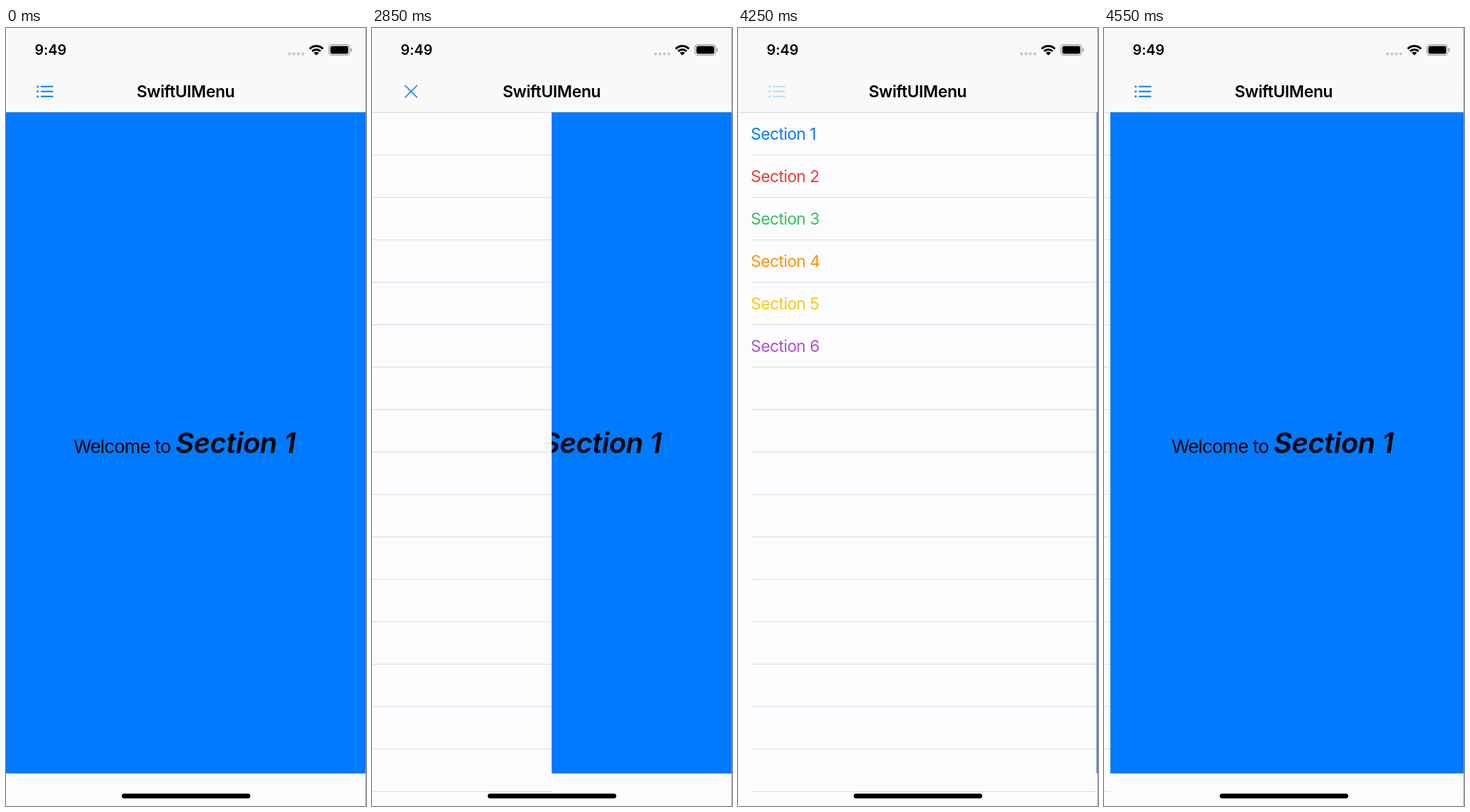
An HTML page with a canvas for the animation above (4.6 s loop, 509 by 1100 pixels).

```html
<!DOCTYPE html>
<html lang="en">
<head>
<meta charset="utf-8">
<title>Slide-in menu</title>
<style>
  html, body { margin: 0; width: 100%; height: 100%; overflow: hidden; background: #fcfcfe; }
  canvas { display: block; width: 509px; height: 1100px; }
</style>
</head>
<body>
<canvas id="stage" width="509" height="1100"></canvas>
<script>
const W = 509, H = 1100, LOOP = 4600, STEP = 50;
const BAR = 119.2, PAGE_END = 1054, RULE = 119, ROW = 60, INSET = 21;
const SLIDE = 350, FADE = 250, PRESS = 85;
const OPEN = 2675, HOLD = 2900, SHOWN = 4100, CLOSE = 4233;
const PAPER = '#fcfcfe', BLUE = '#007aff', TINT = '#0080ee';
const SECTIONS = [BLUE, '#f03a2f', '#30c456', '#f89408', '#f8cb08', '#ab51d8'];

const ctx = document.getElementById('stage').getContext('2d');
const clamp = v => Math.min(1, Math.max(0, v));

// Ease-in-out: cubic Bezier (.42, 0) (.58, 1)
function ease(x) {
  x = clamp(x);
  let lo = 0, hi = 1;
  for (let i = 0; i < 24; i++) {
    const s = (lo + hi) / 2, r = 1 - s;
    if (1.26 * r * r * s + 1.74 * r * s * s + s * s * s < x) lo = s; else hi = s;
  }
  return lo * lo * (3 - 2 * lo);
}

function text(str, x, y, font, color, spacing, align = 'left') {
  ctx.font = font + ' Inter, "Liberation Sans", sans-serif';
  ctx.letterSpacing = spacing + 'px';
  ctx.textAlign = align;
  ctx.fillStyle = color;
  ctx.fillText(str, x, y);
}

function rect(x, y, w, h, color) {
  ctx.fillStyle = color;
  ctx.fillRect(x, y, w, h);
}

function pill(x, y, w, h, r, color) {
  ctx.fillStyle = color;
  ctx.beginPath();
  ctx.roundRect(x, y, w, h, r);
  ctx.fill();
}

function dot(x, y, r, color) {
  ctx.fillStyle = color;
  ctx.beginPath();
  ctx.arc(x, y, r, 0, Math.PI * 2);
  ctx.fill();
}

function line(x1, y1, x2, y2) {
  ctx.beginPath();
  ctx.moveTo(x1, y1);
  ctx.lineTo(x2, y2);
  ctx.stroke();
}

function wifi(x, y) {
  const a = Math.PI * 0.25;
  ctx.strokeStyle = '#000';
  ctx.lineCap = 'butt';
  ctx.lineWidth = 3;
  for (const r of [13.2, 8.3]) {
    ctx.beginPath();
    ctx.arc(x, y, r, -Math.PI / 2 - a, -Math.PI / 2 + a);
    ctx.stroke();
  }
  ctx.fillStyle = '#000';
  ctx.beginPath();
  ctx.moveTo(x, y);
  ctx.arc(x, y, 5, -Math.PI / 2 - a, -Math.PI / 2 + a);
  ctx.fill();
}

function battery() {
  ctx.strokeStyle = '#a0a0a6';
  ctx.lineWidth = 1.3;
  ctx.beginPath();
  ctx.roundRect(456.6, 23.6, 29.4, 14.8, 4.2);
  ctx.stroke();
  pill(458.6, 25.6, 25.4, 10.8, 2.5, '#000');
  pill(487.2, 28.6, 1.7, 5, 1, '#a0a0a6');
}

function icon(isClose, alpha) {
  ctx.globalAlpha = alpha;
  ctx.strokeStyle = TINT;
  ctx.lineCap = 'round';
  ctx.lineWidth = 1.9;
  if (isClose) {
    line(47, 81.5, 63.5, 98);
    line(63.5, 81.5, 47, 98);
  } else {
    for (const y of [82.8, 89.8, 96.8]) {
      dot(44.8, y, 1.5, TINT);
      line(50, y, 66, y);
    }
  }
  ctx.globalAlpha = 1;
}

function topBar(isClose, alpha) {
  rect(0, 0, W, BAR, '#f9f9fa');
  rect(0, BAR, W, 0.45, 'rgba(0, 0, 0, 0.3)');
  text('9:49', 40.5, 38.4, '600 20px', '#000', -0.1);
  for (let i = 0; i < 4; i++) dot(400.8 + i * 6.3, 36.6, 2.1, '#c6c5d0');
  wifi(438.8, 38.8);
  battery();
  icon(isClose, alpha);
  text('SwiftUIMenu', 254, 97.6, '600 23px', '#000', -0.38, 'center');
}

function page() {
  rect(0, 0, W, H, PAPER);
  rect(0, RULE, W, PAGE_END - RULE, BLUE);
  text('Welcome to', 95.4, 601, '400 26px', '#000', -0.8);
  text('Section 1', 239.8, 601, 'italic 600 40px', '#000', -0.4);
}

function menu(edge) {
  if (edge <= 0) return;
  ctx.save();
  ctx.translate(edge - W, 0);
  rect(0, RULE, W, H - RULE, PAPER);
  for (let i = 1; i <= 16; i++) {
    rect(INSET, RULE + i * ROW, W - INSET, 1, '#dcdbe6');
  }
  SECTIONS.forEach((color, i) =>
    text('Section ' + (i + 1), 20, 158 + i * ROW, '400 22.8px', color, -0.5));
  ctx.restore();
}

// Green fringe along the right side, darker where it borders the blue page
function fringe(edge) {
  rect(W - 1, 0, 1, H, '#4cff1c');
  if (edge < W) rect(W - 1, RULE, 1, PAGE_END - RULE, '#00ec00');
}

function iconAlpha(t) {
  for (const tap of [OPEN, CLOSE]) {
    const dt = t - tap;
    if (dt >= -PRESS && dt < FADE) return 0.2 + 0.8 * clamp(dt / FADE);
  }
  return 1;
}

function menuEdge(t) {
  const shown = t < SHOWN
    ? ease((Math.min(t, HOLD) - OPEN) / SLIDE)
    : 1 - ease((t - CLOSE) / SLIDE);
  return Math.round(W * shown);
}

function draw(t) {
  const edge = menuEdge(t);
  page();
  menu(edge);
  topBar(t >= OPEN && t < CLOSE, iconAlpha(t));
  pill(163.6, 1082.4, 181.8, 6.8, 3.4, '#000');
  fringe(edge);
}

const start = performance.now();
function tick() {
  const t = (performance.now() - start) % LOOP;
  draw(Math.floor(t / STEP) * STEP);
  requestAnimationFrame(tick);
}
tick();
</script>
</body>
</html>
```
